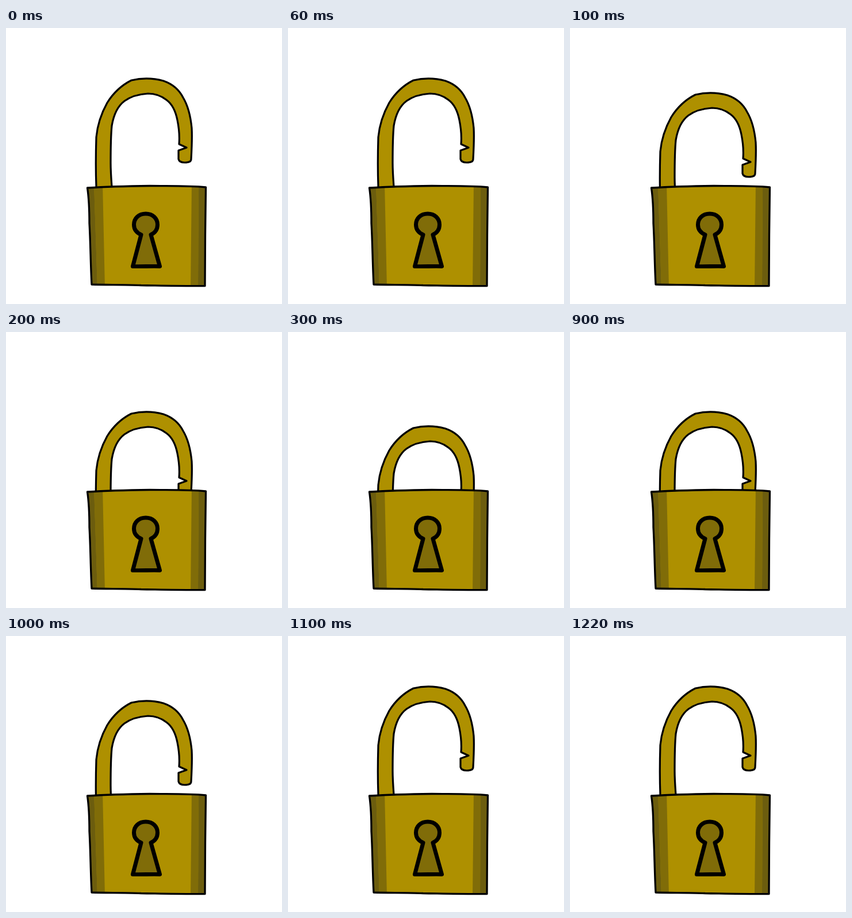
Animation of 480 by 480 pixels, one loop 1.3 s. Source, as an HTML page with a canvas:

```html
<!DOCTYPE html>
<html lang="en">
<head>
<meta charset="utf-8">
<title>Padlock</title>
<style>
html, body { margin: 0; width: 100%; height: 100%; overflow: hidden; background: #fff; }
canvas { display: block; width: 480px; height: 480px; }
</style>
</head>
<body>
<canvas id="stage" width="480" height="480"></canvas>
<script>
const ctx = document.getElementById('stage').getContext('2d');
const GOLD = '#ae9000', SHADE = '#806c08', DARK = '#6c5d0e', INK = '#000';
const LOOP = 1300, STEP = 100, CLOSE_AT = 100, OPEN_AT = 900;
const DROPS = [0, 25, 51, 76];

const shackle = new Path2D(`
  M157 370 L157 276 C156 250 156 222 157 190 C159 168 166 148 176 130
  C186 114 200 100 218 91 C235 87 256 87 274 92
  C291 98 301 107 308 121 C317 136 321 153 323 174
  C324 192 323 210 322 228 C322 233 317 234 311 234
  C305 234 301 232 300 228 L300 213 L314 208 L301 202
  C302 190 301 175 298 160 C295 145 290 133 279 125
  C269 117 259 114 247 114 C232 115 217 119 206 127
  C194 136 187 152 184 170 C182 190 182 212 182 235
  C182 250 183 262 184 276 L184 370 Z`);

const body = new Path2D(`
  M141.5 278 C175 276 215 275 250 274.5 C285 275 318 274 347.5 277
  C347 300 347 330 346.5 360 L346 448.5
  C310 449 270 448 235 447.5 C205 446 175 447 149 446
  C147 410 147 375 145 340 C145 315 144 295 141.5 278 Z`);

const keyhole = new Path2D(`
  M235 359.5 C227 356 222.5 350 222.5 342 C222.5 331 231 323 243 323
  C255 323 263.5 331 263.5 342 C263.5 350 259.5 356 252 359.5
  L267.5 414.5 C252 414 236 415 220.5 414.5 Z`);

function outline(path, fill, width) {
  ctx.fillStyle = fill;
  ctx.fill(path);
  ctx.lineWidth = width;
  ctx.stroke(path);
}

// Vertical band given by its left and right edges at the top and bottom.
function band(color, topLeft, topRight, bottomLeft, bottomRight) {
  ctx.fillStyle = color;
  ctx.beginPath();
  ctx.moveTo(topLeft, 270);
  ctx.lineTo(topRight, 270);
  ctx.lineTo(bottomRight, 452);
  ctx.lineTo(bottomLeft, 452);
  ctx.fill();
}

function dropAt(t) {
  const closing = Math.floor((t - CLOSE_AT) / STEP) + 1;
  const opening = Math.floor((t - OPEN_AT) / STEP) + 1;
  const stage = t < OPEN_AT ? closing : 3 - opening;
  return DROPS[Math.max(0, Math.min(3, stage))];
}

function draw(t) {
  ctx.fillStyle = '#fff';
  ctx.fillRect(0, 0, 480, 480);
  ctx.strokeStyle = INK;
  ctx.lineJoin = 'round';

  ctx.save();
  ctx.beginPath();
  ctx.rect(0, 0, 480, 276);
  ctx.clip();
  ctx.translate(0, dropAt(t));
  outline(shackle, GOLD, 3.2);
  ctx.restore();

  ctx.save();
  ctx.clip(body);
  ctx.fillStyle = GOLD;
  ctx.fillRect(130, 265, 230, 195);
  band(SHADE, 153, 168, 159, 172);
  band(DARK, 130, 153, 130, 159);
  band(SHADE, 323, 335, 321, 334);
  band(DARK, 335, 360, 334, 360);
  ctx.restore();
  ctx.lineWidth = 3.3;
  ctx.stroke(body);

  outline(keyhole, SHADE, 7);
}

const start = performance.now();
function tick() {
  draw((performance.now() - start) % LOOP);
  requestAnimationFrame(tick);
}
tick();
</script>
</body>
</html>
```
